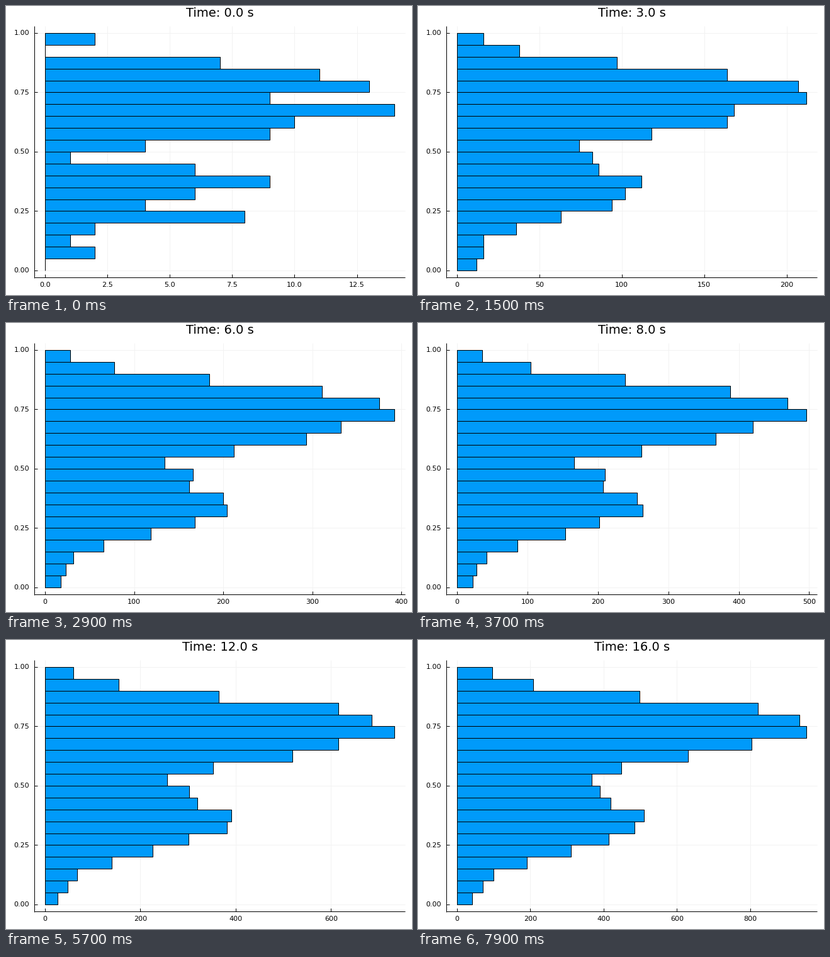
Recreate the animation shown at these times as a matplotlib script. Size 645 px wide and 460 px high, loop 8000 ms.

```python
import numpy as np
import matplotlib.pyplot as plt
from matplotlib.animation import FuncAnimation
from matplotlib.patches import Rectangle

W, H, DPI = 645, 460, 100
FRAMES, INTERVAL = 80, 100
STEP_SECONDS = 0.205
LEFT, RIGHT, TOP, BOTTOM = 45.35, 633.65, 30.66, 431.34
X0, X_SPAN = 62, 555        # zero line and length of the longest bar
Y0, Y_SPAN = 420, 378       # pixels of value 0 and distance to value 1
BINS, MAX_TICKS = 20, 8
PX = 72 / DPI

# Bin counts (lowest bin first) at a few steps; samples arrive evenly between.
COUNTS = {
    0: [0, 2, 1, 2, 8, 4, 6, 9, 6, 1,
        4, 9, 10, 14, 9, 13, 11, 7, 0, 2],
    9: [9, 14, 9, 26, 42, 54, 59, 80, 53, 42,
        46, 73, 108, 94, 136, 133, 94, 66, 23, 11],
    21: [14, 18, 23, 47, 84, 134, 144, 144, 118, 123,
         101, 162, 219, 243, 287, 281, 234, 128, 52, 21],
    37: [22, 28, 42, 86, 154, 202, 264, 256, 207, 210,
         166, 262, 367, 420, 496, 469, 388, 239, 105, 36],
    57: [26, 48, 67, 140, 226, 301, 382, 391, 319, 303,
         256, 353, 519, 616, 733, 685, 615, 364, 155, 60],
    70: [36, 64, 89, 170, 274, 366, 456, 455, 385, 356,
         317, 412, 585, 730, 853, 827, 745, 452, 186, 83],
    79: [42, 71, 99, 191, 310, 413, 485, 510, 419, 389,
         367, 449, 630, 804, 953, 934, 821, 498, 208, 97],
}
STEPS = list(COUNTS)
TABLE = np.array(list(COUNTS.values()))

# Tick step mantissas and how nice each one is
NICE = [(1, 1.0), (5, 0.9), (2, 0.7), (2.5, 0.5), (3, 0.2)]


def counts_at(i):
    return np.round([np.interp(i, STEPS, col) for col in TABLE.T])


def nice_ticks(peak):
    """Pick the tick step with the best mix of count, coverage and niceness."""
    hi, span = 1.03 * peak, 1.06 * peak
    order = int(np.floor(np.log10(span)))
    best, best_score = None, -1
    for z in (order - 1, order):
        for q, nice in NICE:
            step = q * 10.0 ** z
            n = int(hi / step + 1e-9) + 1
            if not 4 <= n <= MAX_TICKS:
                continue
            score = (0.25 * (1 - abs(n - 5) / 5)
                     + 0.5 * span / ((n - 1) * step) + 0.25 * nice)
            if score > best_score:
                best, best_score = step * np.arange(n), score
    return best


plt.rcParams["font.family"] = "DejaVu Sans"
# The tiny margin keeps float rounding from losing a pixel row.
fig = plt.figure(figsize=((W + 1e-4) / DPI, (H + 1e-4) / DPI), dpi=DPI,
                 facecolor="white")
ax = fig.add_axes([0, 0, 1, 1])
ax.set_xlim(0, W)
ax.set_ylim(H - 1, -1)
ax.axis("off")


def line(xs, ys, color="black", z=4):
    return ax.plot(xs, ys, color=color, lw=PX, zorder=z,
                   solid_capstyle="butt")[0]


def label(x, y, text, ha, size=8):
    return ax.text(x, y, text, ha=ha, va="baseline", fontsize=size, zorder=5)


GRID = "#f2f2f2"
line([LEFT, LEFT], [TOP, BOTTOM + 0.5])
line([LEFT, RIGHT], [BOTTOM, BOTTOM])
for v in np.linspace(0, 1, 5):
    y = Y0 - Y_SPAN * v
    line([LEFT, RIGHT], [y, y], GRID, 1)
    line([LEFT, LEFT + 5], [y, y])
    label(37, y + 3, f"{v:.2f}", "right")

title = label(340, 16, "", "center", 14)
bin_h = Y_SPAN / BINS
bars = [ax.add_patch(Rectangle((X0, Y0 - bin_h * (k + 1)), 0, bin_h,
                               facecolor="#009afa", edgecolor="black",
                               lw=PX, zorder=3))
        for k in range(BINS)]
ticks = [(line([0, 0], [TOP, BOTTOM], GRID, 1),
          line([0, 0], [BOTTOM - 5, BOTTOM]),
          label(0, 446, "", "center"))
         for _ in range(MAX_TICKS)]


def update(i):
    counts = counts_at(i)
    scale = X_SPAN / counts.max()
    for bar, c in zip(bars, counts):
        bar.set_width(c * scale)

    values = nice_ticks(counts.max())
    decimals = 0 if values[1] % 1 == 0 else 1
    for k, (grid, mark, text) in enumerate(ticks):
        shown = k < len(values)
        for part in (grid, mark, text):
            part.set_visible(shown)
        if shown:
            x = X0 + values[k] * scale
            grid.set_xdata([x, x])
            mark.set_xdata([x, x])
            text.set_x(x)
            text.set_text(f"{values[k]:.{decimals}f}")

    title.set_text(f"Time: {round(i * STEP_SECONDS):.1f} s")
    return []


anim = FuncAnimation(fig, update, frames=FRAMES, interval=INTERVAL,
                     init_func=lambda: update(0), repeat=True, repeat_delay=0)
plt.show()
```
